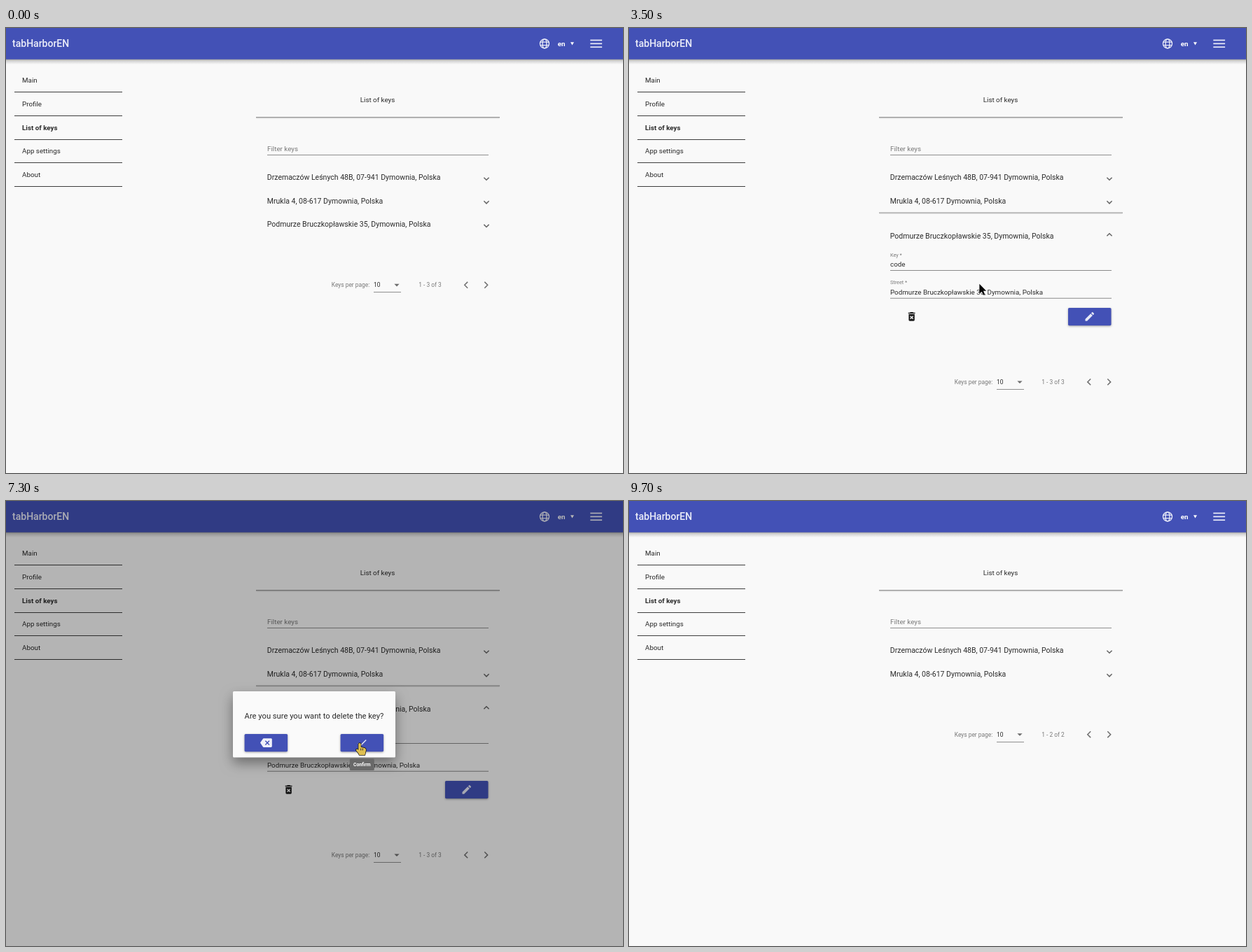
Recreate the animation shown at these times as an HTML page with a canvas. Size 881 px wide and 636 px high, loop 9.9 s.

```html
<!DOCTYPE html>
<html lang="en">
<head>
<meta charset="utf-8">
<title>List of keys</title>
<style>
html, body { margin: 0; width: 100%; height: 100%; overflow: hidden; background: #f9f9f9; }
canvas { display: block; }
</style>
</head>
<body>
<canvas id="stage" width="881" height="636"></canvas>
<script>
const W = 881, H = 636, LOOP = 9900;
const ctx = document.getElementById('stage').getContext('2d');
const BG = '#f9f9f9', BLUE = '#4351b6', INK = '#2b2b2b', GREY = '#7a7a7a', PALE = '#eceef9';

const MENU = ['Main', 'Profile', 'List of keys', 'App settings', 'About'];
const PLACES = [
  'Drzemaczów Leśnych 48B, 07-941 Dymownia, Polska',
  'Mrukla 4, 08-617 Dymownia, Polska',
  'Podmurze Bruczkopławskie 35, Dymownia, Polska'
];

const ICONS = {
  edit: new Path2D('M3 17.25V21h3.75L17.81 9.94l-3.75-3.75zM20.71 7.04c.39-.39.39-1.02 0-1.41l-2.34-2.34c-.39-.39-1.02-.39-1.41 0l-1.83 1.83 3.75 3.75z'),
  check: new Path2D('M9 16.17L4.83 12l-1.42 1.41L9 19 21 7l-1.41-1.41z'),
  erase: new Path2D('M22 3H7c-.69 0-1.23.35-1.59.88L0 12l5.41 8.11c.36.53.9.89 1.59.89h15c1.1 0 2-.9 2-2V5c0-1.1-.9-2-2-2z'),
  bin: new Path2D('M6 19c0 1.1.9 2 2 2h8c1.1 0 2-.9 2-2V7H6zM15.5 4l-1-1h-5l-1 1H5v2h14V4z')
};
const ARROW = new Path2D('M0 0V14L3.3 11 5.6 16 7.8 15 5.6 10.2H9.8z');
const HAND = new Path2D('M-1.7 1.5Q-1.7 0 0 0Q1.7 0 1.7 1.5V5.8L7 7Q9 7.6 9 10L8 14.5 7.4 17H-.6L-1.4 15-5 10.5Q-5.4 8.4-3.5 8.5L-1.7 9.8z');

// Pointer waypoints: time, x, y
const TRACK = [
  [100, 797, 93], [700, 691, 209], [1300, 691, 209], [1700, 691, 244],
  [2300, 691, 244], [2700, 692, 277], [3100, 692, 277], [3700, 404.5, 410],
  [5900, 404.5, 410], [6700, 505, 346], [7300, 505, 346], [7500, 503.5, 345],
  [7900, 503.5, 345], [8300, 513, 339], [8900, 513, 339], [9500, 828, 178]
];

const within = (t, a, b) => t >= a && t < b;

function text(str, x, midY, size, color = INK, weight = 400, align = 'left') {
  ctx.font = `${weight} ${size}px Roboto, sans-serif`;
  ctx.fillStyle = color;
  ctx.textAlign = align;
  ctx.fillText(str, x, midY + size * 0.355);
}

function box(x, y, w, h, color, r = 0) {
  ctx.fillStyle = color;
  ctx.beginPath();
  ctx.roundRect(x, y, w, h, r);
  ctx.fill();
}

function disc(x, y, r, color) {
  ctx.fillStyle = color;
  ctx.beginPath();
  ctx.arc(x, y, r, 0, 7);
  ctx.fill();
}

function stroke(points, color, width) {
  ctx.strokeStyle = color;
  ctx.lineWidth = width;
  ctx.beginPath();
  points.forEach(([x, y]) => ctx.lineTo(x, y));
  ctx.stroke();
}

function shaded(blur, dy, alpha, draw) {
  ctx.save();
  ctx.shadowColor = `rgba(0,0,0,${alpha})`;
  ctx.shadowBlur = blur;
  ctx.shadowOffsetY = dy;
  draw();
  ctx.restore();
}

function icon(name, x, y, color, cross) {
  ctx.save();
  ctx.translate(x - 8.4, y - 8.4);
  ctx.scale(0.7, 0.7);
  ctx.fillStyle = color;
  ctx.fill(ICONS[name]);
  if (cross) {
    const [cx, cy, r, tint] = cross;
    stroke([[cx - r, cy - r], [cx + r, cy + r]], tint, 2);
    stroke([[cx - r, cy + r], [cx + r, cy - r]], tint, 2);
  }
  ctx.restore();
}

function button(x, y) {
  shaded(3, 1, 0.35, () => box(x, y, 61.5, 25.2, BLUE, 1.6));
}

function edge(y, alpha) {
  ctx.globalAlpha = alpha;
  box(357, y - 0.5, 348, 1.3, '#949494');
  box(357.5, y + 0.8, 347, 1, '#dedede');
  ctx.globalAlpha = 1;
}

function toolbar() {
  const g = ctx.createLinearGradient(0, 44, 0, 52);
  g.addColorStop(0, 'rgba(0,0,0,.42)');
  g.addColorStop(0.35, 'rgba(0,0,0,.16)');
  g.addColorStop(1, 'rgba(0,0,0,0)');
  ctx.fillStyle = g;
  ctx.fillRect(0, 44, W, 8);
  box(0, 0, W, 44.8, BLUE);
  text('tabHarborEN', 9, 22.4, 14, PALE, 500);

  ctx.strokeStyle = PALE;
  ctx.lineWidth = 1.3;
  for (const rx of [6.5, 2.9]) {
    ctx.beginPath();
    ctx.ellipse(769, 22.4, rx, 6.5, 0, 0, 7);
    ctx.stroke();
  }
  for (const dy of [-2.3, 2.3]) stroke([[763, 22.4 + dy], [775, 22.4 + dy]], PALE, 1.2);

  text('en', 787.7, 22.6, 9.8, '#fff', 700);
  ctx.fillStyle = '#fff';
  ctx.fill(new Path2D('M806 20.2h5l-2.5 4.4z'));
  for (let i = 0; i < 3; i++) box(834.3, 16.6 + i * 4.9, 16.8, 1.7, PALE);
}

function sidebar() {
  MENU.forEach((label, i) => {
    const y = 75 + i * 33.6;
    text(label, 23, y, 9.8, INK, i === 2 ? 700 : 400);
    box(12, Math.round(y + 16.4), 154, 1, '#3d3d3d');
  });
}

function field(label, value, y) {
  text(label, 373, y, 7.3, GREY);
  text(value, 373, y + 13.4, 9.8);
  box(373, y + 22, 316, 1, '#8a8a8a');
}

function panelBody(place, y, t) {
  field('Key *', 'code', y + 48.8);
  field('Street *', place, y + 88.5);
  const top = y + 124.8;
  if (within(t, 3700, 5900)) box(373, top, 61.5, 25.2, '#dfdfdf', 1.5);
  if (within(t, 4500, 5700)) disc(404.5, top + 11.5, 11.5, 'rgba(0,0,0,.13)');
  icon('bin', 403.6, top + 12.4, '#1c1c1c', [12, 14, 2.9, '#f4f4f4']);
  button(627, top);
  icon('edit', 657.8, top + 12.4, '#e6e8f6');
}

function list(t, count, open, k) {
  let y = 196.8;
  for (let i = 0; i < count; i++) {
    const a = i === open ? k : 0;
    if (i) y += 11.2 * a;
    const h = 33.6 + 127.4 * a, mid = y + 16.8 + 5.6 * a;
    text(PLACES[i], 372.8, mid - 0.3, 10.5);
    const cy = mid + 1.9 - 4 * a, s = 1.8 * (1 - 2 * a);
    stroke([[682.4, cy - s], [686, cy + s], [689.6, cy - s]], '#666', 1.5);
    if (a) {
      ctx.save();
      ctx.beginPath();
      ctx.rect(350, y, 362, h);
      ctx.clip();
      panelBody(PLACES[i], y, t);
      ctx.restore();
    }
    y += h;
    if (k && i + 1 < count && (i === open || i === open - 1)) edge(y, k);
    if (i + 1 < count) y += 11.2 * a;
  }
  pager(y + 69.7, count);
}

function pager(y, count) {
  text('Keys per page:', 464.8, y, 8.4, GREY);
  text('10', 525, y, 8.4);
  ctx.fillStyle = '#6c6c6c';
  ctx.beginPath();
  ctx.moveTo(554.4, y - 1.5);
  ctx.lineTo(561.6, y - 1.5);
  ctx.lineTo(558, y + 2.1);
  ctx.fill();
  box(525, Math.round(y + 9.8), 39, 1, '#8f8f8f');
  text(`1 - ${count} of ${count}`, 589.3, y, 8.4, GREY);
  for (const [x, d] of [[657, 1], [685.5, -1]])
    stroke([[x + 2.2 * d, y - 4.4], [x - 2.2 * d, y], [x + 2.2 * d, y + 4.4]], '#707070', 1.5);
}

function page(t) {
  box(0, 0, W, H, BG);
  toolbar();
  sidebar();
  text('List of keys', 530.5, 103, 9.8, INK, 400, 'center');
  edge(127.6, 1);
  text('Filter keys', 373, 172.3, 9.8, GREY);
  box(373, 181, 316, 1, '#8f8f8f');
  const [open, k] = openState(t);
  list(t, t >= 8100 ? 2 : 3, open, k);
}

// Which panel is unfolded, and how far
function openState(t) {
  if (within(t, 900, 1700)) return [0, t < 1100 ? 0.6 : t < 1500 ? 1 : 0.4];
  if (within(t, 2100, 2700)) return [1, t < 2300 ? 0.6 : t < 2500 ? 1 : 0.4];
  if (within(t, 2900, 8100)) return [2, t < 3100 ? 0.6 : 1];
  return [-1, 0];
}

function dialog(t) {
  if (!within(t, 5700, 7900)) return;
  const opening = t < 5900, closing = t >= 7500;
  if (!closing) box(0, 0, W, H, `rgba(0,0,0,${opening ? 0.255 : 0.28})`);
  ctx.save();
  ctx.translate(440, 319.3 + (opening ? 2.2 : closing ? 8 : 0));
  if (opening) ctx.scale(0.991, 0.991);
  ctx.translate(-440, -319.3);
  ctx.globalAlpha = closing ? 0.67 : 1;
  shaded(18, 8, closing ? 0.22 : 0.4, () => box(324, 272, 232, 94.6, '#fafafa', 1.5));
  text('Are you sure you want to delete the key?', 340.6, 307, 11.2);
  button(340.6, 333);
  button(477.6, 333);
  icon('erase', 371.4, 345.6, '#f0f1fa', [14.5, 12, 4, BLUE]);
  icon('check', 508.4, 345.6, '#e6e8f6');
  if (closing) {
    ctx.beginPath();
    ctx.rect(477.6, 333, 61.5, 25.2);
    ctx.clip();
    disc(505, 345, 22, 'rgba(255,255,255,.2)');
  }
  ctx.restore();
}

function tip(label, x, y, w, h, alpha) {
  ctx.globalAlpha = alpha;
  box(x, y, w, h, '#696969', 1.5);
  text(label, x + w / 2, y + h / 2, 6.8, '#fff', 700, 'center');
  ctx.globalAlpha = 1;
}

function tips(t) {
  if (within(t, 4100, 5700)) tip('Delete key', 381.7, 434.3, 43.4, 17.5, t < 4300 ? 0.6 : 1);
  if (within(t, 7100, 7900)) tip('Confirm', 490.8, 368.3, 35, 16.8, t < 7300 ? 0.6 : 1);
}

function pointer(t) {
  if (!within(t, 100, 9700)) return;
  let i = 0;
  while (i < TRACK.length - 2 && t >= TRACK[i + 1][0]) i++;
  const [t0, x0, y0] = TRACK[i], [t1, x1, y1] = TRACK[i + 1];
  const p = Math.min(1, (t - t0) / (t1 - t0));
  const confirm = within(t, 6700, 7500);
  const hand = confirm || within(t, 700, 3300);
  const shape = hand ? HAND : ARROW;
  ctx.save();
  ctx.translate(x0 + (x1 - x0) * p, y0 + (y1 - y0) * p);
  ctx.lineJoin = 'round';
  ctx.lineWidth = confirm ? 1.4 : 0.8;
  ctx.strokeStyle = confirm ? '#111' : hand ? '#000' : 'rgba(255,255,255,.55)';
  ctx.fillStyle = confirm ? '#dfc052' : '#080808';
  ctx.stroke(shape);
  ctx.fill(shape);
  if (confirm) for (const x of [1.7, 4.3]) stroke([[x, 7.5], [x, 10.5]], '#111', 0.8);
  ctx.restore();
}

function frame() {
  const now = performance.now() % LOOP;
  // The picture advances in 200 ms steps after the first 100 ms
  const t = now < 100 ? 0 : 100 + Math.floor((now - 100) / 200) * 200;
  page(t);
  dialog(t);
  tips(t);
  pointer(t);
  requestAnimationFrame(frame);
}
frame();
</script>
</body>
</html>
```
